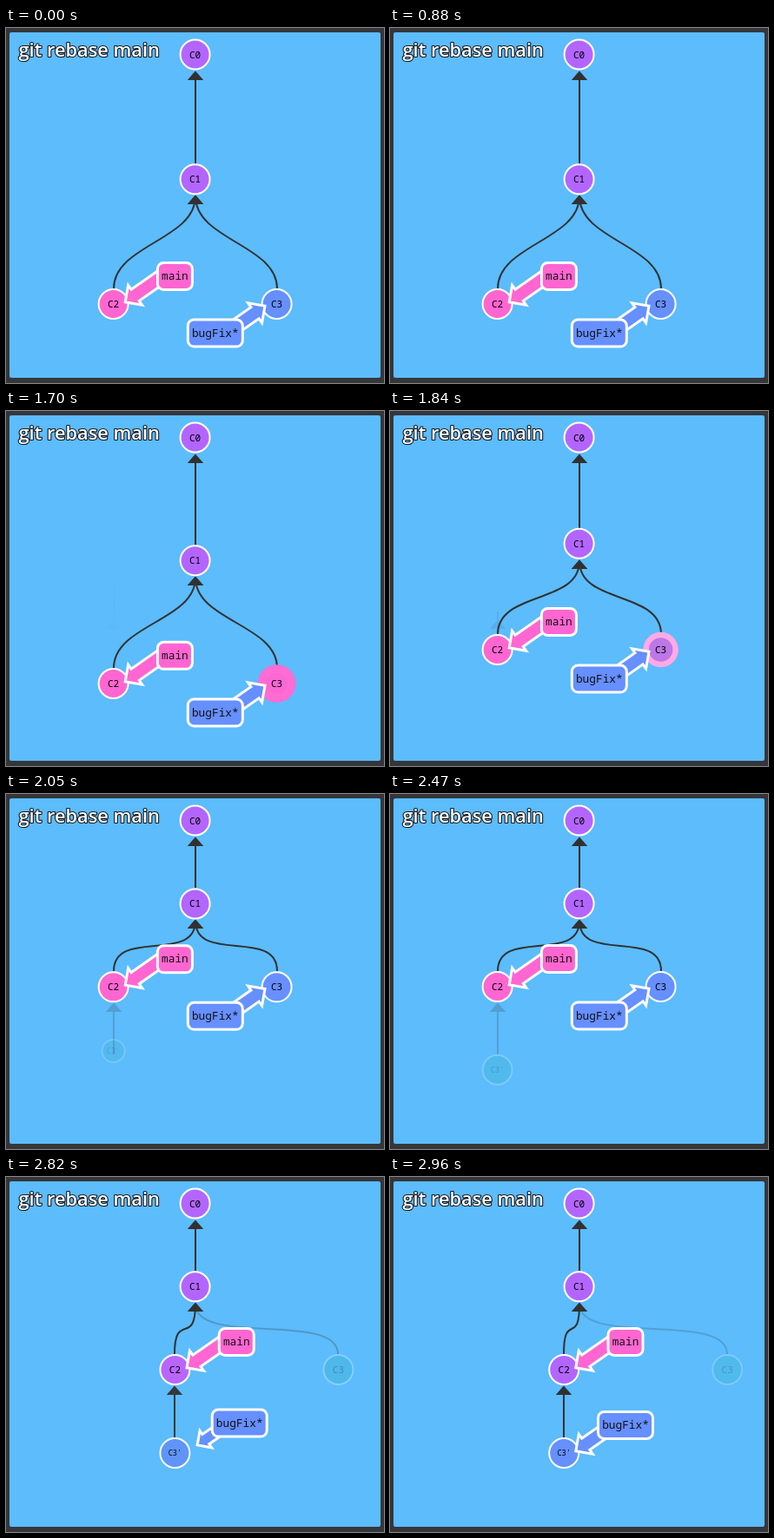
These frames come from a looping animation (435 by 409 pixels, 4100 ms). An HTML page:

```html
<!DOCTYPE html>
<html lang="en">
<head>
<meta charset="utf-8">
<title>git rebase main</title>
<style>
  html, body { margin: 0; width: 100%; height: 100%; overflow: hidden; background: #35363a; }
  svg { display: block; width: 435px; height: 409px; }
  .title {
    font: 600 21.8px "Open Sans", "Noto Sans", sans-serif;
    fill: #fff; stroke: #15181c; stroke-width: 2.2px; stroke-linejoin: round; paint-order: stroke;
  }
  .commit text, .branch text { font-family: "Noto Sans Mono", "DejaVu Sans Mono", monospace; text-anchor: middle; }
  .commit text { font-size: 11px; font-weight: 500; }
  .commit text.long { font-size: 8.6px; }
  .branch text { font-size: 12.8px; fill: #111; }
  .branch path, .branch rect { stroke: #fff; stroke-width: 3; }
  .edge path { fill: none; stroke: #313131; stroke-width: 2; }
  .edge .head { fill: #313131; }
</style>
</head>
<body>
<svg viewBox="0 0 435 409">
  <rect x="4" y="5" width="427" height="398" rx="2" fill="#5cbcfc"/>
  <g id="edges"></g>
  <g id="commits"></g>
  <g id="branches"></g>
  <text class="title" x="14.5" y="33">git rebase main</text>
</svg>
<script>
const LOOP = 4100;
const RADIUS = 17;
const FADED = 0.2;
const PURPLE = [179, 102, 255], PINK = [255, 102, 209], BLUE = [102, 143, 255];
const TEAL = [36, 179, 179], WHITE = [255, 255, 255];

// Phases: highlight the commit, grow its copy, then move the branch over.
const HIGHLIGHT = [862, 545], SQUEEZE = [1638, 431], BIRTH = [1638, 836], MOVE = [2473, 430];

const lerp = (a, b, p) => a + (b - a) * p;
const mix = (a, b, p) => a.map((v, i) => lerp(v, b[i], p));
const rgb = c => `rgb(${c.map(Math.round)})`;
const progress = (t, [start, length]) => Math.min(1, Math.max(0, (t - start) / length));

function easeInOut(n) {
  if (n <= 0 || n >= 1) return n;
  const q = 0.48 - n / 1.04;
  const r = Math.sqrt(0.1734 + q * q);
  const s = Math.cbrt(r - q) + Math.cbrt(-r - q) + 0.5;
  return 3 * (1 - s) * s * s + s * s * s;
}

function bounce(n) {
  const k = 7.5625, d = 2.75;
  if (n < 1 / d) return k * n * n;
  if (n < 2 / d) return k * (n - 1.5 / d) ** 2 + 0.75;
  if (n < 2.5 / d) return k * (n - 2.25 / d) ** 2 + 0.9375;
  return k * (n - 2.625 / d) ** 2 + 0.984375;
}

function set(el, attrs) {
  for (const name in attrs) el.setAttribute(name, attrs[name]);
  return el;
}

function add(parent, tag, attrs = {}) {
  const el = document.createElementNS("http://www.w3.org/2000/svg", tag);
  return parent.appendChild(set(el, attrs));
}

const layer = id => document.getElementById(id);

// Edges run on whole pixels.
function makeEdge() {
  const g = add(layer("edges"), "g", { class: "edge" });
  const line = add(g, "path");
  const head = add(g, "path", { class: "head", d: "M0 0l-7 8h14z" });
  return (child, parent, opacity = 1) => {
    const [x1, y1, x2, y2] = [child.x, child.y - 18, parent.x, parent.y + 20].map(Math.round);
    set(line, { d: `M${x1} ${y1}C${x1} ${y1 - 50} ${x2} ${y2 + 50} ${x2} ${y2}` });
    set(head, { transform: `translate(${x2} ${y2})` });
    set(g, { opacity });
  };
}

function makeCommit(name) {
  const g = add(layer("commits"), "g", { class: "commit" });
  const circle = add(g, "circle");
  const long = name.length > 2;
  const text = add(g, "text", { y: long ? 3 : 4, class: long ? "long" : "" });
  text.textContent = name;
  return ({ x, y }, fill, { stroke = WHITE, width = 2, opacity = 1, r = RADIUS } = {}) => {
    set(g, { transform: `translate(${x} ${y})`, opacity });
    set(circle, { r, fill: rgb(fill), stroke: rgb(stroke), "stroke-width": width });
  };
}

// The arrow is laid out from its tip towards the label, as seen from the commit.
const ANGLE = -35 * Math.PI / 180;
const ARROW = [[52, -8], [14, -8], [14, -14], [0, 0], [14, 14], [14, 8], [52, 8]].map(([x, y]) => [
  13.6 + x * Math.cos(ANGLE) - y * Math.sin(ANGLE),
  -2.2 + x * Math.sin(ANGLE) + y * Math.cos(ANGLE)
]);

function makeBranch(name, color, width) {
  const g = add(layer("branches"), "g", { class: "branch", fill: rgb(color) });
  const arrow = add(g, "path");
  const label = add(g, "g");
  add(label, "rect", { x: -width / 2, y: -15.5, width, height: 31, rx: 7 });
  add(label, "text", { y: 4.2 }).textContent = name;
  // side: 1 puts the label up right of the commit, -1 down left.
  return ({ x, y }, side) => {
    set(arrow, { d: "M" + ARROW.map(([dx, dy]) => [x + side * dx, y + side * dy]).join("L") + "z" });
    set(label, { transform: `translate(${x + side * 70.8} ${y + 0.7 - side * 32.8})` });
  };
}

const edges = { c1: makeEdge(), copy: makeEdge(), c2: makeEdge(), c3: makeEdge() };
const copy = makeCommit("C3'");
const [c0, c1, c2, c3] = ["C0", "C1", "C2", "C3"].map(makeCommit);
const bugFix = makeBranch("bugFix*", BLUE, 63);
const main = makeBranch("main", PINK, 40);

function draw(t) {
  const lit = easeInOut(progress(t, HIGHLIGHT));
  const squeeze = easeInOut(progress(t, SQUEEZE));
  const born = bounce(progress(t, BIRTH));
  const move = easeInOut(progress(t, MOVE));

  const rowY = lerp(318, 222, squeeze);
  const x2 = lerp(123.6, 200.2, move);
  const p0 = { x: 217.6, y: 30.5 };
  const p1 = { x: 217.6, y: lerp(174.2, 126.3, squeeze) };
  const p2 = { x: x2, y: rowY };
  const p3 = { x: x2 + 188, y: rowY };
  const pCopy = { x: x2, y: lerp(222, 318, born) };

  const fade3 = lerp(1, FADED, move);
  const fadeCopy = lerp(FADED, 1, move);

  edges.c1(p1, p0);
  edges.c2(p2, p1);
  edges.c3(p3, p1, fade3);
  edges.copy({ x: x2, y: lerp(222, 318, squeeze) }, { x: x2, y: 222 }, fadeCopy * squeeze);

  const glow = lit * (1 - squeeze);
  c0(p0, PURPLE);
  c1(p1, PURPLE);
  c2(p2, mix(PINK, PURPLE, move));
  c3(p3, mix(mix(BLUE, PINK, glow), TEAL, move), {
    stroke: mix(WHITE, PINK, glow), width: lerp(2, 10, glow), opacity: fade3
  });
  copy(pCopy, mix(TEAL, BLUE, move), { opacity: fadeCopy * born, r: RADIUS * born });

  main(p2, 1);
  bugFix({ x: lerp(p3.x, x2, move), y: lerp(rowY, pCopy.y, move) }, 2 * move - 1);
}

// The picture advances in 70 ms ticks.
function tick(t) {
  const base = t < 1630 ? 940 : 1630;
  return base + Math.floor((t - base) / 70) * 70;
}

function frame(now) {
  draw(tick(now % LOOP));
  requestAnimationFrame(frame);
}

draw(0);
requestAnimationFrame(frame);
</script>
</body>
</html>
```
